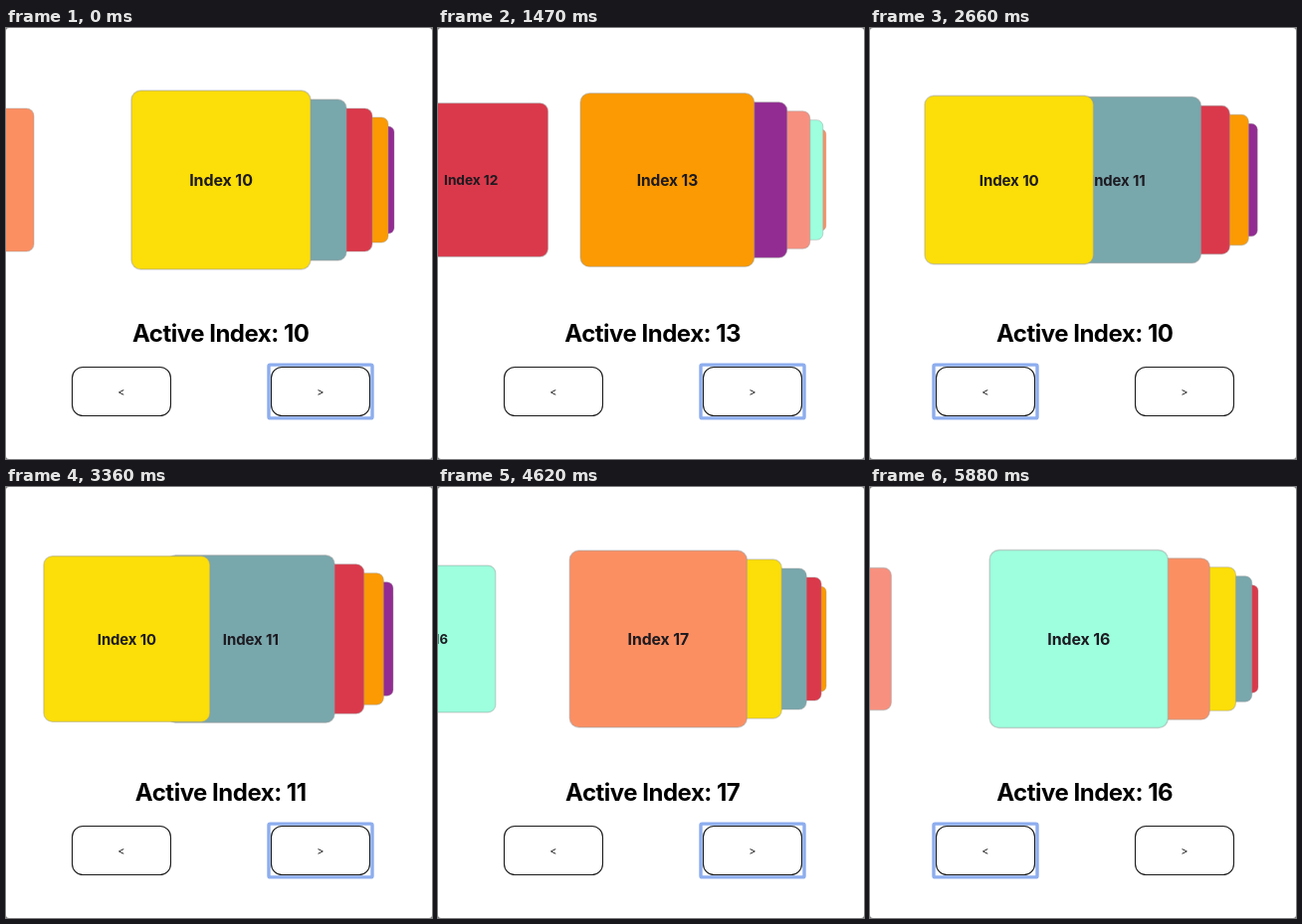
Write an HTML page that moves like this. It is 428x434 px and loops after 5.95 s.

```html
<!DOCTYPE html>
<html lang="en">
<head>
<meta charset="utf-8">
<title>Card stack carousel</title>
<style>
  html, body { margin: 0; width: 100%; height: 100%; overflow: hidden; background: #fff; }
  svg { display: block; width: 428px; height: 434px; }
  text { font-family: Inter, "Open Sans", sans-serif; text-anchor: middle; }
  .label { font-size: 16px; font-weight: 700; fill: #1c1a20; letter-spacing: -0.1px; }
  .title { font-size: 24px; font-weight: 700; fill: #000; letter-spacing: -0.5px; }
  .glyph { font-size: 11px; fill: #222; }
  .card rect { stroke: #999; stroke-opacity: .45; stroke-width: 1.4; }
  .button { fill: #fff; stroke: #1b1b1b; stroke-width: 1.1; }
  .focus { fill: none; stroke: #8dadee; stroke-width: 3.4; }
</style>
</head>
<body>
<svg id="stage" viewBox="0 0 428 434">
  <rect width="428" height="434" fill="#777"/>
  <rect width="428" height="434" rx="3" fill="#fff"/>
  <g id="cards"></g>
  <text id="title" class="title" x="215.7" y="316"></text>
  <rect class="button" x="66.5" y="341.5" width="99" height="49" rx="11"/>
  <text class="glyph" x="116" y="370.7">&lt;</text>
  <rect class="button" x="266.5" y="341.5" width="99" height="49" rx="11"/>
  <text class="glyph" x="316" y="370.7">&gt;</text>
  <rect id="focus" class="focus" y="339.1" width="104" height="53.8" rx="1.5"/>
</svg>
<script>
const LOOP = 5950, STEP = 70, START = 10;
const CENTER_X = 216, CENTER_Y = 153, SIZE = 180;
const COLORS = ['#9dffde', '#fc8f62', '#fcde08', '#78a7ac',
                '#da394b', '#fb9a02', '#922b92', '#f8907f'];

// Button presses: [time in ms, direction]
const clicks = [
  [540, 1], [939, 1], [1340, 1],
  [2140, -1], [2335, -1], [2536, -1],
  [3285, 1], [3480, 1], [3681, 1], [3850, 1], [4050, 1], [4250, 1], [4451, 1], [4640, 1],
  [5475, -1], [5677, -1]
];

const titleNode = document.getElementById('title');
const focusNode = document.getElementById('focus');
const cardLayer = document.getElementById('cards');

function svgNode(tag, attributes, parent) {
  const node = document.createElementNS('http://www.w3.org/2000/svg', tag);
  for (const name in attributes) node.setAttribute(name, attributes[name]);
  return parent.appendChild(node);
}

function makeCard(index) {
  const node = svgNode('g', { class: 'card' }, cardLayer);
  svgNode('rect', {
    x: -SIZE / 2, y: -SIZE / 2, width: SIZE, height: SIZE,
    rx: 9.5, fill: COLORS[index % COLORS.length]
  }, node);
  svgNode('text', { class: 'label', y: 6 }, node).textContent = 'Index ' + index;
  return { index, node };
}

// Lower indices are painted last, on top of the stack.
const cards = [];
for (let index = 24; index >= 7; index--) cards.push(makeCard(index));

// Step response of a damped spring (stiffness 230, damping 22).
function spring(ms) {
  const t = ms / 1000, decay = 11, frequency = Math.sqrt(230.2 - decay * decay);
  const angle = frequency * t;
  return 1 - Math.exp(-decay * t) * (Math.cos(angle) + decay / frequency * Math.sin(angle));
}

function placeCard({ index, node }, position) {
  const d = index - position;
  const visible = d > -2 && d < 5;
  node.style.display = visible ? '' : 'none';
  if (!visible) return;
  const shift = d < 0 ? 260 * d : 50 * d - 5 * d * d;
  const scale = d < 0 ? 1 + .2 * d : 1 - .1 * d;
  node.setAttribute('transform', `translate(${CENTER_X + shift} ${CENTER_Y}) scale(${scale})`);
}

function draw(time) {
  let active = START, position = START, direction = 1;
  for (const [at, delta] of clicks) {
    if (at > time) break;
    active += delta;
    position += delta * spring(time - at);
    direction = delta;
  }
  for (const card of cards) placeCard(card, position);
  titleNode.textContent = 'Active Index: ' + active;
  focusNode.setAttribute('x', direction > 0 ? 264 : 64);
}

const startTime = performance.now();
function tick() {
  const time = (performance.now() - startTime) % LOOP;
  draw(Math.floor(time / STEP) * STEP);
  requestAnimationFrame(tick);
}
tick();
</script>
</body>
</html>
```
